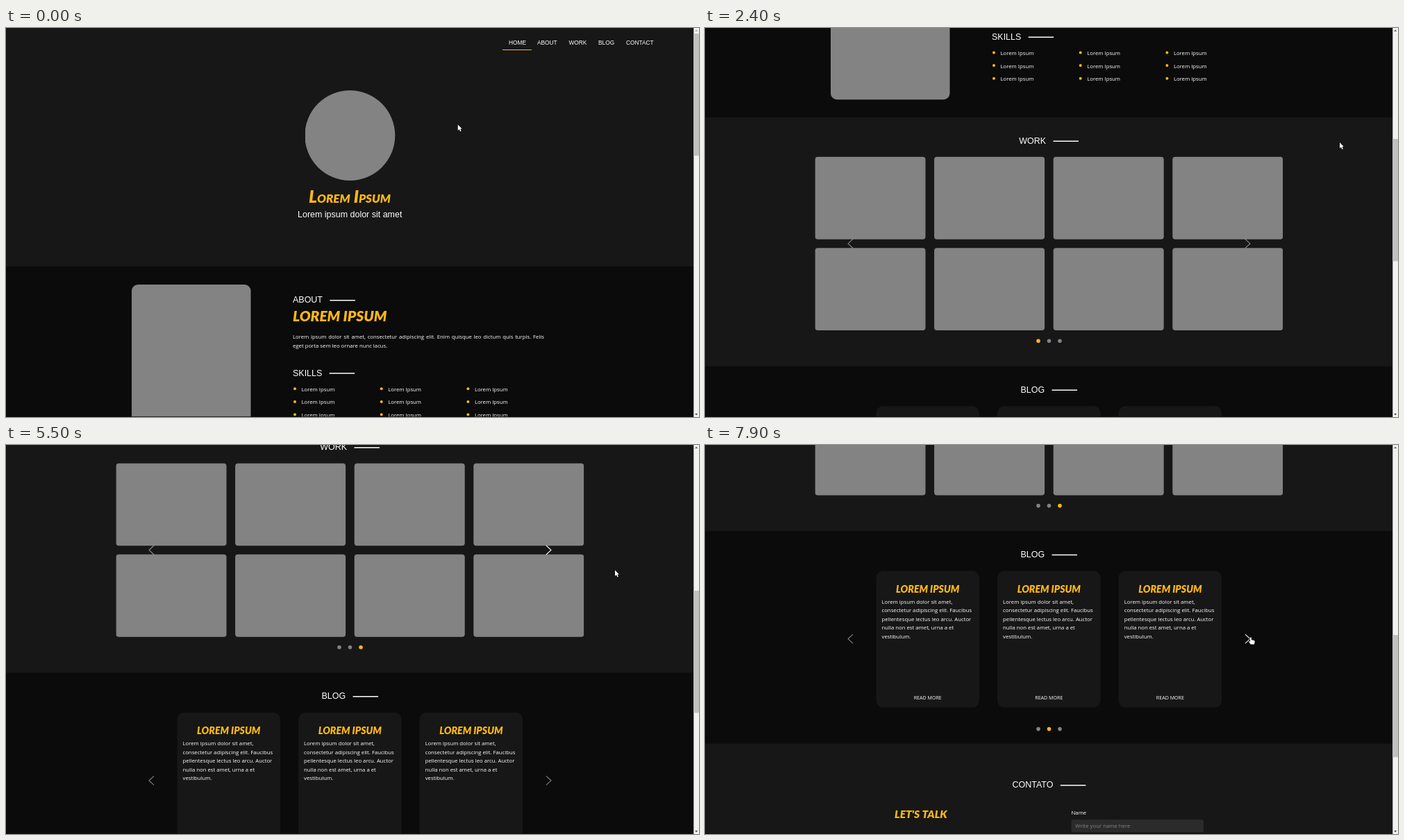
An HTML page with a canvas for the animation above (8 s loop, 998 px wide and 561 px high).

```html
<!DOCTYPE html>
<html lang="en">
<head>
<meta charset="utf-8">
<title>Portfolio scroll</title>
<style>
  html, body { margin: 0; width: 100%; height: 100%; overflow: hidden; background: #0b0b0b; }
  canvas { display: block; }
</style>
</head>
<body>
<canvas id="stage" width="998" height="561"></canvas>
<script>
const ctx = document.getElementById('stage').getContext('2d');
const LOOP = 8000, WIDTH = 998, HEIGHT = 561, VIEW = 990.3;
const GREY = '#838383', PANEL = '#171717', DARK = '#0b0b0b', YELLOW = '#ffb910', WHITE = '#fff';
const SANS = '"Liberation Sans", Arial, sans-serif';
const BODY = '7.75px "Open Sans", "Noto Sans", sans-serif';
const marker = (size, variant = '') => `italic ${variant} 900 ${size}px Lato, "Open Sans", sans-serif`;

const NOTCH = 121.2;
const SCROLLS = [[50, 270], [650, 270], [1320, 270], [1850, 270], [2820, 270], [5400, 270], [6000, 160]];
const SLIDE = 674, SLIDE_LEFT = 158.3;
const WORK_CLICKS = [[3933, 600], [4540, 560]];
const BLOG_CLICKS = [[7230, 600]];
// start, end, x, y of each pointer move
const MOVES = [
  [1950, 2400, 914, 165],
  [3400, 3900, 791, 186],
  [4700, 5100, 873, 180],
  [5200, 5300, 877, 180.5],
  [6300, 7100, 786, 277]
];
const CARD_TEXT = ['Lorem ipsum dolor sit amet,', 'consectetur adipiscing elit. Faucibus',
  'pellentesque lectus leo arcu. Auctor', 'nulla non est amet, urna a et', 'vestibulum.'];

const ARROW = new Path2D('M0 0V8.6L2 6.8L3.4 10L4.9 9.3L3.5 6.2H6Z');
const HAND = new Path2D('M-.9 1Q0-.6.9 1V4L4.4 4.7Q6 5 5.8 6.6L5 10.6H-.2L-2.9 6.8Q-2.9 5.4-.9 6.6Z');

function ease(t, start, duration) {
  const p = Math.min(1, Math.max(0, (t - start) / duration));
  return p * p * (3 - 2 * p);
}

const progress = (t, steps) => steps.reduce((sum, [start, span]) => sum + ease(t, start, span), 0);

function rect(x, y, w, h, color, radius = 0) {
  ctx.fillStyle = color;
  ctx.beginPath();
  ctx.roundRect(x, y, w, h, radius);
  ctx.fill();
}

function dot(x, y, r, color) {
  ctx.fillStyle = color;
  ctx.beginPath();
  ctx.arc(x, y, r, 0, 7);
  ctx.fill();
}

function text(str, x, y, font, color = WHITE, align = 'left') {
  ctx.font = font;
  ctx.fillStyle = color;
  ctx.textAlign = align;
  ctx.fillText(str, x, y);
}

function justified(str, x, y, width, font) {
  ctx.font = font;
  const gap = (width - ctx.measureText(str).width) / (str.split(' ').length - 1);
  ctx.wordSpacing = gap + 'px';
  text(str, x, y, font);
  ctx.wordSpacing = '0px';
}

function heading(str, x, y) {
  text(str, x, y, '12.48px ' + SANS);
  rect(x + ctx.measureText(str).width + 10.4, y - 4.3, 36.5, 1.5, WHITE);
}

function chevrons(y, highlight) {
  [[213, 206, 0.5], [778, 785, 0.5 + 0.45 * highlight]].forEach(([back, tip, alpha]) => {
    ctx.strokeStyle = `rgba(255,255,255,${alpha})`;
    ctx.lineWidth = 1.1;
    ctx.beginPath();
    ctx.moveTo(back, y - 6.5);
    ctx.lineTo(tip, y);
    ctx.lineTo(back, y + 6.5);
    ctx.stroke();
  });
}

function carousel(t, clicks, top, height, drawSlide, dotsY) {
  const position = progress(t, clicks);
  ctx.save();
  ctx.beginPath();
  ctx.rect(SLIDE_LEFT, top, SLIDE, height);
  ctx.clip();
  for (let i = Math.floor(position); i <= Math.ceil(position); i++) {
    ctx.save();
    ctx.translate((i - position) * SLIDE, 0);
    drawSlide();
    ctx.restore();
  }
  ctx.restore();
  const active = clicks.filter(([start]) => t >= start).length;
  for (let i = 0; i < 3; i++) dot(480 + i * 15.5, dotsY, 2.8, i === active ? YELLOW : GREY);
}

function hero() {
  rect(0, 0, VIEW, 343.7, PANEL);
  const left = [724, 765, 810.5, 853, 893];
  ['HOME', 'ABOUT', 'WORK', 'BLOG', 'CONTACT'].forEach((item, i) =>
    text(item, left[i], 23.5, '8.32px ' + SANS));
  rect(715, 31, 42, 1.1, YELLOW);
  ctx.save();
  ctx.beginPath();
  ctx.rect(431, 80, 140, 150);
  ctx.clip();
  dot(495.3, 155, 65, GREY);
  ctx.restore();
  text('Lorem Ipsum', 495, 251.5, marker(24.5, 'small-caps'), YELLOW, 'center');
  text('Lorem ipsum dolor sit amet', 495.2, 272.7, '12.48px ' + SANS, WHITE, 'center');
}

function about() {
  rect(181, 370, 171.5, 218, GREY, 9);
  heading('ABOUT', 413, 396.3);
  text('LOREM IPSUM', 413, 422.8, marker(20.9), YELLOW);
  justified('Lorem ipsum dolor sit amet, consectetur adipiscing elit. Enim quisque leo dictum quis turpis. Felis',
    413, 448.4, 362, BODY);
  text('eget porta sem leo ornare nunc lacus.', 413, 460.8, BODY);
  heading('SKILLS', 413, 501.5);
  for (let row = 0; row < 3; row++) {
    for (let col = 0; col < 3; col++) {
      const x = 416 + col * 124.7, y = 523.6 + row * 18.7;
      dot(x, y - 3.4, 2, YELLOW);
      text('Lorem Ipsum', x + 9.5, y, BODY);
    }
  }
}

function workSlide() {
  for (let i = 0; i < 8; i++)
    rect(158.5 + (i % 4) * 171.6, i < 4 ? 670.6 : 802, 159, 118.9, GREY, 4);
}

function blogSlide() {
  for (let i = 0; i < 3; i++) {
    const x = 246.5 + i * 174.6, middle = x + 74.2;
    rect(x, 1030, 148.5, 197, PANEL, 10);
    text('LOREM IPSUM', middle, 1061, marker(14.1), YELLOW, 'center');
    CARD_TEXT.forEach((line, n) => text(line, x + 8, 1077.2 + n * 12.5, BODY));
    text('READ MORE', middle, 1215.3, '7.1px "Open Sans", "Noto Sans", sans-serif', WHITE, 'center');
  }
}

function work(t) {
  rect(0, 613.7, VIEW, 358.9, PANEL);
  heading('WORK', 452.3, 651.5);
  carousel(t, WORK_CLICKS, 670, 252, workSlide, 936);
  chevrons(795.7, ease(t, 3700, 150));
}

function blog(t) {
  heading('BLOG', 454.5, 1010.5);
  carousel(t, BLOG_CLICKS, 1029, 200, blogSlide, 1258);
  chevrons(1128, ease(t, 6750, 150));
}

function contact() {
  rect(0, 1279, VIEW, 300, PANEL);
  heading('CONTATO', 442.5, 1342.7);
  text("LET'S TALK", 273, 1386, marker(15.6), YELLOW);
  text('Lorem ipsum dolor', 273, 1414, BODY);
  text('Name', 527.5, 1381, BODY);
  rect(527.5, 1388.7, 190.5, 18.3, '#2b2b2b', 3);
  text('Write your name here', 533.3, 1400.8, BODY, '#858585');
}

function scrollbar(scroll) {
  rect(VIEW, 0, WIDTH - VIEW, HEIGHT, '#f1f1f1');
  rect(VIEW, 8 + scroll * 0.3134, WIDTH - VIEW, 176.3, '#c1c1c1');
  [[4.8, -2.4, scroll > 0 ? '#505050' : '#a3a3a3'], [556, 2.4, '#505050']].forEach(([y, tip, color]) => {
    ctx.fillStyle = color;
    ctx.beginPath();
    ctx.moveTo(992.1, y);
    ctx.lineTo(996.3, y);
    ctx.lineTo(994.2, y + tip);
    ctx.fill();
  });
}

function pointer(t) {
  let x = 650.7, y = 139.3;
  for (const [start, end, toX, toY] of MOVES) {
    const p = ease(t, start, end - start);
    x += (toX - x) * p;
    y += (toY - y) * p;
  }
  const shape = t > 3400 && x < 832 ? HAND : ARROW;
  ctx.save();
  ctx.translate(x, y);
  ctx.strokeStyle = '#000';
  ctx.lineWidth = 1;
  ctx.stroke(shape);
  ctx.fillStyle = WHITE;
  ctx.fill(shape);
  ctx.restore();
}

function frame() {
  const t = performance.now() % LOOP;
  const scroll = NOTCH * progress(t, SCROLLS);
  rect(0, 0, WIDTH, HEIGHT, DARK);
  ctx.save();
  ctx.translate(0, -scroll);
  hero();
  about();
  work(t);
  blog(t);
  contact();
  ctx.restore();
  rect(0, 560.3, VIEW, 1, DARK);
  scrollbar(scroll);
  pointer(t);
  requestAnimationFrame(frame);
}
frame();
</script>
</body>
</html>
```
